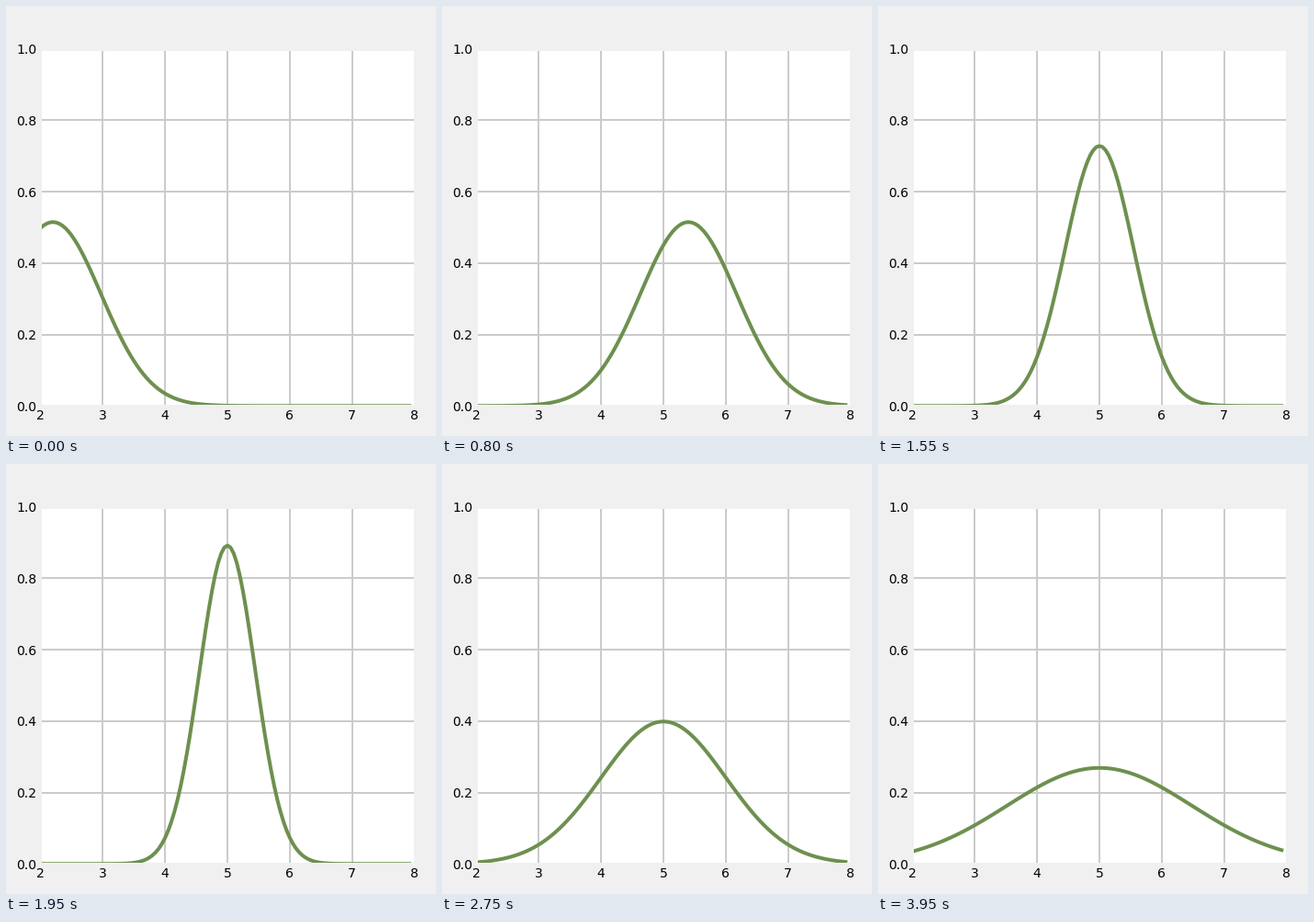
Recreate the animation shown at these times as a matplotlib script. Size 468x468 px, loop 4 s.

```python
import numpy as np
import matplotlib.pyplot as plt
from matplotlib.animation import FuncAnimation

SIZE, DPI = 468, 72
FRAMES, INTERVAL = 80, 50
BG, GRID, GREEN = "#f0f0f0", "#cbcbcb", "#6d904f"
SLIDE, VAR0, STEP = 25, 0.6, 0.05

plt.rcParams.update({"font.family": "DejaVu Sans", "font.size": 14})

fig = plt.figure(figsize=(SIZE / DPI, SIZE / DPI), dpi=DPI, facecolor=BG)
ax = fig.add_axes([0.08, 0.07, 0.87, 0.83], facecolor="white")
ax.set(xlim=(2, 8), ylim=(0, 1))
ax.set_axisbelow(True)
ax.grid(True, color=GRID, linewidth=2, linestyle="-")
ax.tick_params(length=0, pad=4, labelsize=14, labelcolor="black")
for spine in ax.spines.values():
    spine.set(edgecolor=BG, linewidth=3)

x = np.arange(2, 7.975, 0.05)
curve, = ax.plot(x, 0 * x, color=GREEN, linewidth=4, solid_capstyle="butt")


def normal(x, mean, var):
    return np.exp(-(x - mean) ** 2 / (2 * var)) / np.sqrt(2 * np.pi * var)


def params(i):
    """The mean slides first, then jumps to 5 while the variance dips and grows."""
    if i < SLIDE:
        return 2.2 + 0.2 * i, VAR0
    return 5, STEP * (1 + abs(i - 36))


def update(i):
    curve.set_ydata(normal(x, *params(i)))
    return curve,


anim = FuncAnimation(fig, update, frames=FRAMES, interval=INTERVAL,
                     repeat=True, repeat_delay=0, blit=False)
plt.show()
```
